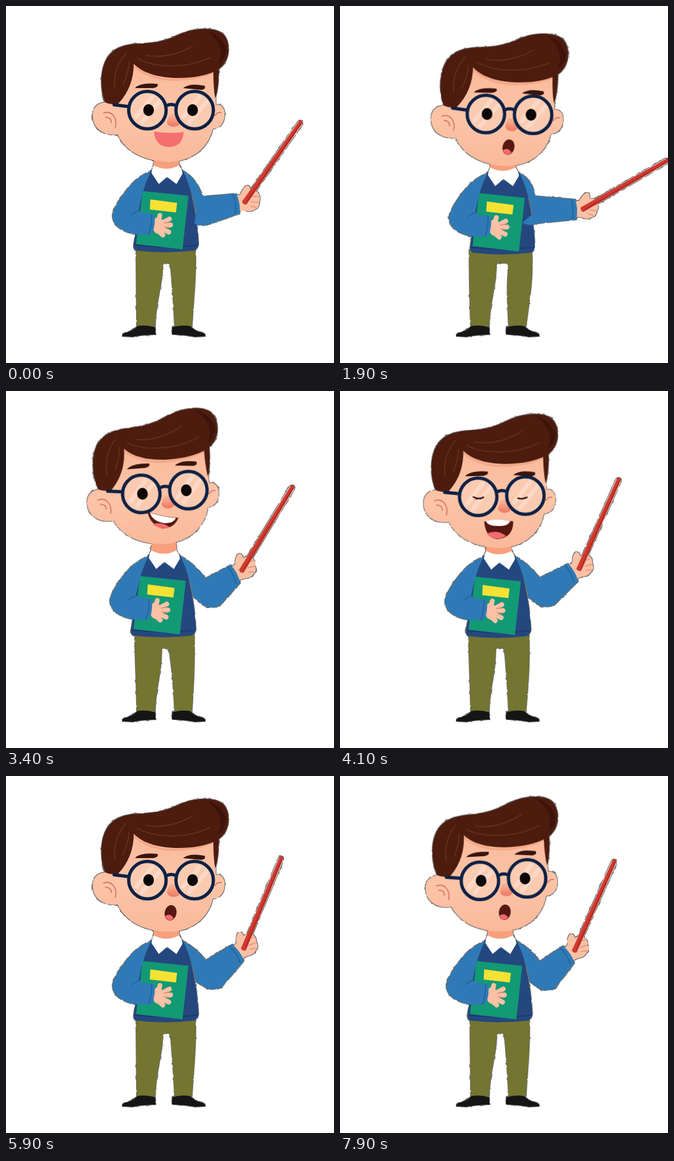
These frames come from a looping animation (552x600 px, 8000 ms). An HTML page:

```html
<!DOCTYPE html>
<html lang="en">
<head>
<meta charset="utf-8">
<title>Teacher with a pointer</title>
<style>
html, body { margin: 0; width: 100%; height: 100%; overflow: hidden; background: #fff; }
svg { display: block; width: 552px; height: 600px; }
.skin { fill: url(#skin); }
.hair { fill: #4d1c0f; }
.strand { fill: none; stroke: #70391f; stroke-width: 1.6; stroke-linecap: round; opacity: .8; }
.sleeve { fill: #2f7ab6; }
.seam { fill: none; stroke: #215f98; stroke-width: 1.6; }
.crease { fill: none; stroke: #d6766a; stroke-width: 1.8; stroke-linecap: round; }
.finger { fill: none; stroke: #fbc1a5; stroke-width: 8; stroke-linecap: round; }
.frame { fill: none; stroke: #0d2145; stroke-width: 5.5; stroke-linecap: round; }
.glint { stroke: #fee3d5; stroke-width: 7; stroke-linecap: round; opacity: .6; }
.lid { fill: none; stroke: #3b1715; stroke-width: 2.6; stroke-linecap: round; }
.pupil { fill: #0c0706; }
.dark { fill: #561810; }
.tongue { fill: #f56a6e; }
.teeth { fill: #fff; }
</style>
</head>
<body>
<svg viewBox="0 0 552 600">
  <defs>
    <linearGradient id="skin" x1="0" y1="0" x2="0" y2="1">
      <stop offset="0" stop-color="#f9b797"/>
      <stop offset=".55" stop-color="#fcc4a7"/>
      <stop offset="1" stop-color="#fab99a"/>
    </linearGradient>
    <linearGradient id="nose" x1="0" y1="0" x2="0" y2="1">
      <stop offset="0" stop-color="#f7a88a" stop-opacity=".5"/>
      <stop offset=".8" stop-color="#f0806a"/>
    </linearGradient>
    <filter id="edge" filterUnits="userSpaceOnUse" x="0" y="0" width="552" height="600" color-interpolation-filters="sRGB">
      <feMorphology in="SourceAlpha" operator="dilate" radius="1" result="fat"/>
      <feTurbulence type="fractalNoise" baseFrequency=".12" numOctaves="2" seed="4" result="noise"/>
      <feDisplacementMap in="fat" in2="noise" scale="3" xChannelSelector="R" yChannelSelector="G" result="rough"/>
      <feFlood flood-color="#555" flood-opacity=".85"/>
      <feComposite in2="rough" operator="in" result="line"/>
      <feMerge><feMergeNode in="line"/><feMergeNode in="SourceGraphic"/></feMerge>
    </filter>
    <path id="shoe" d="M196 555Q195 551 201 549Q214 546 221 538Q236 535 251 540L252 552Q225 553 213 556Z" fill="#151515"/>
    <g id="lens">
      <circle r="31" fill="#fbcbb1"/>
      <path class="glint" d="M-19 11L8-22M-9 20L20-14"/>
    </g>
  </defs>

  <g filter="url(#edge)">
    <path id="pants" fill="#747530"/>
    <use href="#shoe"/>
    <use href="#shoe" transform="matrix(-1 0 0 1 531 0)"/>

    <g id="body">
      <path fill="#f7a07d" d="M250 252H290L293 276H247Z"/>
      <path fill="#24477f" d="M245 275L271 290L296 275Q308 290 313 322Q322 360 324 400Q322 409 317 411Q268 417 219 411Q214 408 215 401Q222 360 226 320Q232 290 245 275Z"/>
      <path d="M216 402Q270 408 323 402" fill="none" stroke="#1b3868" stroke-width="1.5"/>
      <path fill="#fff" d="M249 268Q270 279 291 268Q297 275 297 282L287 299L271 287L257 299L245 281Q245 274 249 268Z"/>
      <path d="M257 299L271 287L287 299" fill="none" stroke="#cfd5de" stroke-width="1"/>
      <path fill="#129a74" d="M230 311L307 319L297 409L219 400Z"/>
      <path fill="#f7e234" d="M243 325L288 331L286 347L242 342Z"/>
      <g class="finger">
        <path d="M255 368L259 352M256 368L275 358M256 370L277 368M256 372L274 380M254 376L264 385"/>
        <ellipse cx="256" cy="369" rx="5" ry="10" fill="#fbc1a5"/>
      </g>
      <path class="crease" d="M266 365L275 363M267 371L276 373" opacity=".6"/>
      <path class="sleeve" d="M244 278Q234 298 229 318L223 344Q236 349 250 350Q252 367 246 383Q226 387 207 381Q180 372 179 352Q183 333 208 303Q226 283 244 278Z"/>
      <path class="seam" d="M240 384Q246 368 245 350M222 344Q216 347 211 351"/>
    </g>

    <g id="hand">
      <path fill="#fbc1a5" d="M-3 -13L5-15Q11-28 18-29Q23-28 22-19Q32-21 36-13Q39-6 35 1Q35 10 27 12Q20 17 10 13L-3 12Z"/>
      <path class="crease" d="M24-10L35-9M22-1L34 1M20 6L29 9" opacity=".6"/>
    </g>
    <g id="stick">
      <path d="M4 0H165" stroke="#fff" stroke-width="9"/>
      <path d="M0-4.5Q-4 0 0 4.5L167 3.5Q171 0 167-3.5Z" fill="#cf3a2f"/>
      <path d="M4 2.3L165 1.8" stroke="#ad271f" stroke-width="1.8"/>
    </g>
    <path id="arm" class="sleeve"/>
    <path id="cuff" class="seam"/>

    <g id="head">
      <path class="skin" d="M190 168C170 157 147 161 146 183C145 206 166 219 188 216C201 246 237 262 275 262C314 261 341 238 348 206C359 206 367 198 368 184C369 171 361 164 353 166L354 105L210 80L180 150Z"/>
      <path class="crease" d="M164 180C177 175 188 187 184 204M168 187Q178 188 177 196M362 179Q355 178 352 184"/>
      <path d="M214 100Q243 125 288 124Q330 122 351 110" fill="none" stroke="#f2a081" stroke-width="4" opacity=".7"/>
      <path class="hair" d="M167 162C158 140 158 108 170 88C180 72 196 65 222 63.5C252 62 268 59 289 49C318 36 350 35 365 47C380 62 377 93 358 106Q358 138 352 155Q349 139 349 111C320 124 245 129 215 97C215 122 207 145 189 164Q177 167 167 162Z"/>
      <path d="M339 42Q360 47 371 72Q369 90 357 98Q371 67 339 42Z" fill="#3d130a"/>
      <path class="strand" d="M221 88C250 104 302 106 343 87M236 83C262 88 291 81 314 67M183 139C181 114 188 95 202 80M197 132C203 119 207 106 207 94"/>
      <path id="brows" fill="#3a150d" d="M217 138Q226 128 255 131Q258 136 248 138ZM298 138Q309 129 334 134Q338 139 329 141Z"/>
      <path d="M276 181Q270 194 271 197Q275 204 284 203Q293 202 293 193Q290 186 287 181Z" fill="url(#nose)"/>
      <use href="#lens" x="238" y="175"/>
      <use href="#lens" x="317.5" y="175"/>
      <g class="eye pupil">
        <ellipse cx="240" cy="175" rx="9" ry="10"/>
        <ellipse cx="314" cy="175" rx="9" ry="10"/>
      </g>
      <g class="eye">
        <path class="pupil" d="M230 174H248Q247 185 239 185Q231 184 230 174ZM305 175H323Q321 186 314 186Q306 185 305 175Z"/>
        <path class="lid" d="M228 174H249M304 175H324"/>
      </g>
      <g class="eye">
        <path class="lid" d="M230 175Q238 180 247 176M234 178H243M305 179Q312 182 320 178"/>
      </g>
      <circle class="frame" cx="238" cy="175" r="31.5"/>
      <circle class="frame" cx="317.5" cy="175" r="31.5"/>
      <path class="frame" d="M271 167Q278 164 285 167M206 169L182 166"/>

      <g class="mouth" id="smile">
        <path fill="#f46f70" d="M249 211Q274 215 299 212Q297 237 274 237Q251 236 249 211Z"/>
      </g>
      <g class="mouth" id="hum">
        <ellipse class="dark" cx="275" cy="229" rx="5" ry="2.6"/>
      </g>
      <g class="mouth" id="smirk">
        <path d="M264 218Q269 222 274 221" fill="none" stroke="#8b3428" stroke-width="2" stroke-linecap="round"/>
      </g>
      <g class="mouth" id="laugh">
        <path class="dark" d="M247 217Q271 212 296 218Q295 246 268 247Q249 245 247 217Z"/>
        <path class="teeth" d="M250 216Q271 212 291 217Q287 226 272 225Q253 225 250 216Z"/>
        <path class="tongue" d="M251 237Q270 230 283 242Q276 247 265 246Q255 244 251 237Z"/>
      </g>
      <g class="mouth" id="grin">
        <path class="dark" d="M246 206Q270 216 297 220Q289 237 269 236Q249 228 246 206Z"/>
        <path class="teeth" d="M250 208Q270 216 293 220Q288 229 272 227Q253 222 250 208Z"/>
        <path class="tongue" d="M253 227Q269 224 282 235Q265 239 253 227Z"/>
      </g>
      <g class="mouth" id="speak">
        <path class="dark" d="M265 217L290 222Q288 234 275 234Q268 231 271 226Z"/>
        <path class="teeth" d="M265 217Q274 213 287 219L285 224L268 224Z"/>
        <path class="tongue" d="M268 230Q275 227 280 233Q273 236 268 230Z"/>
      </g>
      <g class="mouth" id="oh" transform="rotate(12 277 230)">
        <ellipse class="dark" cx="277" cy="230" rx="10" ry="13"/>
        <path class="tongue" d="M269 237Q277 230 284 238Q277 248 269 237Z"/>
      </g>
    </g>
  </g>
</svg>
<script>
const LOOP = 8000, STEP = 100, SYLLABLE = 200;

// Key poses; whatever a pose leaves out is at rest.
// x, y, turn: head; lift, reach: arm; aim: stick; lids: 0 open, 2 shut.
const rest = { x: 0, y: 0, turn: 0, lift: 0, reach: 0, aim: -55, lids: 0 };
const leanIn = { x: -6.2, y: 1, turn: -3.2 }, leanFar = { x: -8, y: -4, turn: -4.6 };
const poses = [
  { t: 0, mouth: "smile" },
  { t: 900, x: 2, y: -1, turn: -3 },
  { t: 1100, x: 5.4, y: 6.4, turn: .7, lift: -.1, aim: -58, lids: 2, mouth: "hum" },
  { t: 1900, x: 6, y: 7, turn: 1, lift: -.2, aim: -30 },
  { t: 2600, x: 5, y: 7, lift: .2, aim: -65 },
  { t: 2800, x: 2.5, y: 1.5, turn: -3, lift: .7, aim: -81, lids: 1, mouth: "smirk" },
  { t: 3200, x: -2, y: -5, turn: -4.5, lift: .5, aim: -60 },
  { t: 3800, ...leanFar, lift: .5 },
  { t: 4100, x: -3.2, y: 2, turn: -1.5, lift: .55, aim: -66, lids: 2, mouth: "laugh" },
  { t: 5000, ...leanIn, lift: 1, reach: -7, aim: -91, mouth: "grin" },
  { t: 5400, lift: .8, aim: -75 },
  { t: 6300, lift: .65, aim: -62 },
  { t: 6700, ...leanIn, lift: .75, reach: 4, aim: -76, mouth: "speak" },
  { t: 7400, ...leanFar, lift: .65, aim: -58 },
  { t: 7900, x: 2, y: -.5, turn: -3, lift: .65, reach: -5, aim: -66, mouth: "oh" }
].map(pose => ({ ...rest, ...pose }));

const $ = id => document.getElementById(id);
const set = (id, name, value) => $(id).setAttribute(name, value);
const mouths = [...document.querySelectorAll(".mouth")];
const eyes = [...document.querySelectorAll(".eye")];

function poseAt(t) {
  const next = poses.findIndex(p => p.t > t);
  if (next < 0) return poses[poses.length - 1];
  const a = poses[next - 1], b = poses[next];
  const p = (t - a.t) / (b.t - a.t), k = p * p * (3 - 2 * p);
  const mix = {};
  for (const key in rest) mix[key] = a[key] + (b[key] - a[key]) * k;
  return mix;
}

// Near a key pose the face holds its look; elsewhere it chatters.
function faceAt(t) {
  const near = poses.find(p => Math.abs(p.t - t) <= STEP) || rest;
  const noise = Math.sin((Math.floor(t / SYLLABLE) + 1) * 12.9898) * 43758.5453;
  const pick = Math.floor((noise - Math.floor(noise)) * mouths.length);
  return { lids: near.lids, mouth: near.mouth ? $(near.mouth) : mouths[pick] };
}

function only(list, chosen) {
  for (const el of list) el.style.display = el === chosen ? "" : "none";
}

function drawPants(x, y) {
  const in1 = 264 + x - y * .8, in2 = 277 + x + y * 1.4, top = 406 + y;
  set("pants", "d",
    `M${219 + x - y} ${top}H${319 + x + y * .5}C${320 + x + y} 455 ${316 + y} 490 313 538H284` +
    `C282 500 280 470 ${in2} 437Q${in2 - 1} 432 ${in2 - 4} 432H${in1 + 3}Q${in1} 432 ${in1} 437` +
    `C262 470 252 500 251 538H220C${220 - y * .5} 490 ${219 + x - y} 450 ${219 + x - y} ${top}Z`);
}

function drawArm(x, y, wx, lift, aim) {
  const wy = 332 - 50 * lift, turn = -5 - 36 * lift;
  const bend = 28 * lift * (1.6 - lift), ex = 330 + bend, ey = 370 - 20 * lift * lift;
  const a = turn * Math.PI / 180, c = Math.cos(a), s = Math.sin(a);
  const at = (along, side) => `${wx + along * c - side * s} ${wy + along * s + side * c}`;
  set("arm", "d",
    `M${298 + x} ${277 + y}Q${321 + x} ${290 + y} ${331 + bend * .3} ${ey - 50}` +
    `L${at(-2, -17)}Q${at(4, 0)} ${at(1, 17)}L${ex + 14} ${ey - 4}Q${ex - 1} ${ey + 2} ${ex - 13} ${ey - 5}` +
    `L${320 + x} ${346 + y}Q${314 + x} ${312 + y} ${298 + x} ${277 + y}Z`);
  set("cuff", "d", `M${at(-8, -16)}Q${at(-3, 0)} ${at(-6, 16)}`);
  set("hand", "transform", `translate(${wx} ${wy}) rotate(${turn})`);
  set("stick", "transform", `translate(${at(10, 0)}) rotate(${aim})`);
}

function draw(t) {
  const { x, y, turn, lift, reach, aim } = poseAt(t), { lids, mouth } = faceAt(t);
  const bx = x * .6 + turn * .5, by = Math.max(0, y) / 2;
  set("head", "transform", `translate(${x} ${y}) rotate(${turn} 268 262)`);
  set("brows", "transform", `translate(0 ${turn * 1.3 + lids * 2})`);
  set("body", "transform", `translate(${bx} ${by})`);
  drawPants(bx * .5, by);
  drawArm(bx, by, 391 + y * .9 + reach, lift, aim);
  only(mouths, mouth);
  only(eyes, eyes[lids]);
}

const start = performance.now();
let last = -1;
function tick() {
  const t = Math.floor(((performance.now() - start) % LOOP) / STEP) * STEP;
  if (t !== last) draw(last = t);
  requestAnimationFrame(tick);
}
tick();
</script>
</body>
</html>
```
